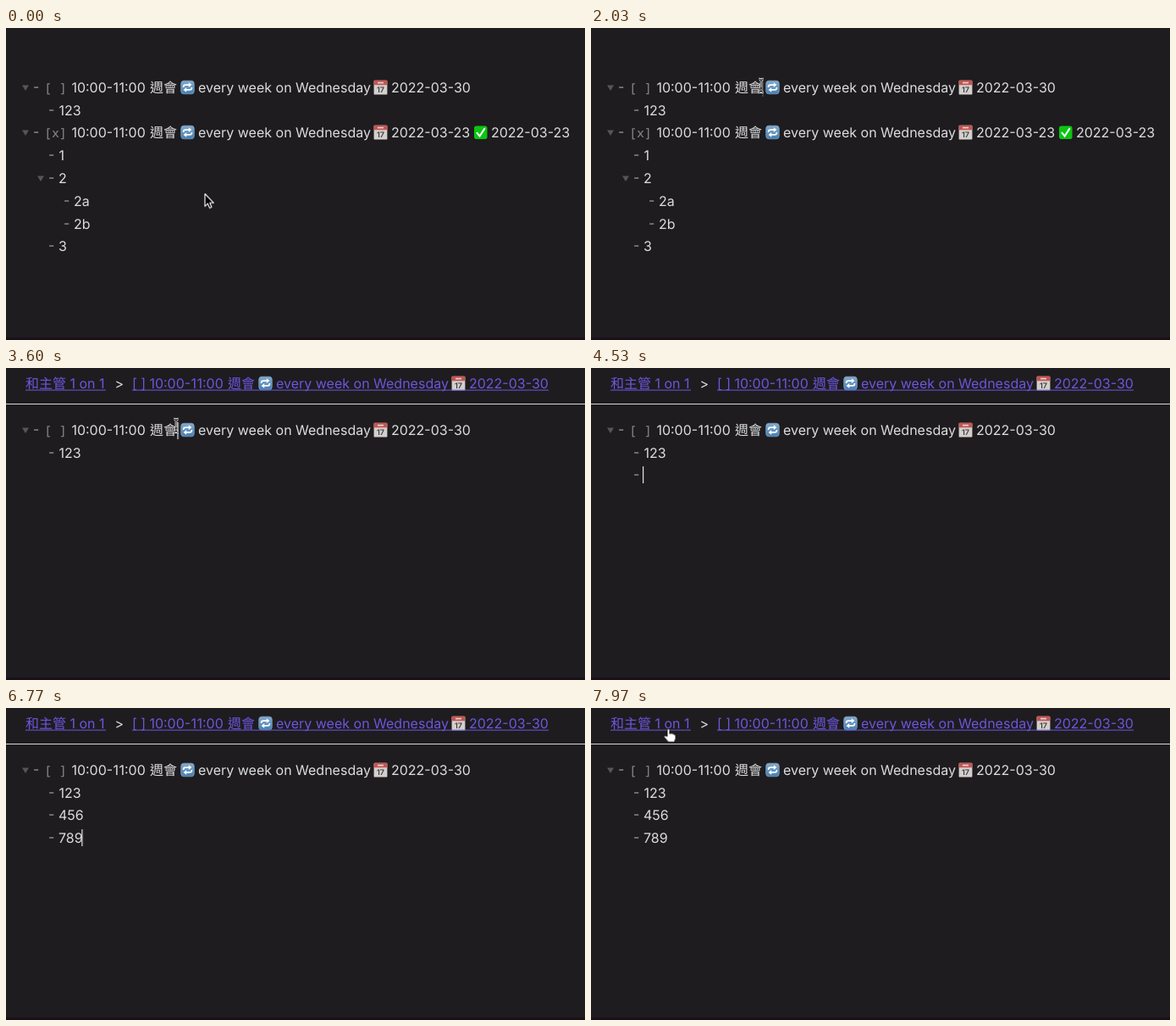
Animation, 684 px wide and 368 px high, one loop 8000 ms. Source, as an HTML page:

```html
<!DOCTYPE html>
<html lang="zh-Hant">
<head>
<meta charset="utf-8">
<title>Outline zoom</title>
<style>
  html, body { margin: 0; width: 100%; height: 100%; overflow: hidden; background: #1e1c1f; }
  svg { display: block; width: 684px; height: 368px; }
  text { font: 16px Inter, "Noto Sans CJK TC", sans-serif; fill: #dcddde; white-space: pre; text-rendering: geometricPrecision; }
  .cjk { font-family: "Noto Sans CJK TC", "Noto Sans CJK", sans-serif; }
  .mark { fill: #999; }
  .box { font: 15px "Noto Sans Mono", "DejaVu Sans Mono", monospace; fill: #888; }
  .fold { fill: #575558; }
  .link text { fill: #6c57dc; }
  .link .line { fill: #6c57dc; }
  .day { font-size: 9px; font-weight: 600; fill: #3c3a3c !important; text-anchor: middle; }
</style>
</head>
<body>
<svg id="stage" viewBox="0 0 684 368">
  <defs>
    <linearGradient id="blue" x2="0" y2="1">
      <stop stop-color="#83abcd"/><stop offset="1" stop-color="#447fb4"/>
    </linearGradient>
    <g id="repeat">
      <rect x=".7" y=".7" width="15.6" height="15.6" rx="3.4" fill="url(#blue)" stroke="#86a5c0" stroke-width=".7"/>
      <g id="turn">
        <path d="M3.6 8.6V8Q3.6 5.6 6 5.6H10.2" fill="none" stroke="#fff" stroke-width="1.7"/>
        <path d="M9.8 2.8L13.4 5.6 9.8 8.4Z" fill="#fff"/>
      </g>
      <use href="#turn" transform="rotate(180 8.5 8.5)"/>
    </g>
    <g id="calendar">
      <rect x=".6" y=".8" width="15.8" height="16.8" rx="1.2" fill="#d3cfcd"/>
      <path d="M.6 6.2V2Q.6 .8 1.8 .8H15.2Q16.4 .8 16.4 2V6.2Z" fill="#c25754"/>
      <path d="M5 3.6H12" stroke="#ecd2d0" stroke-width="1.6"/>
      <text class="day" x="8.5" y="15">17</text>
    </g>
    <g id="check">
      <rect width="15.5" height="15.5" rx="2.8" fill="#0cc511"/>
      <path d="M3.4 8.2L6.6 12 12.2 3.4" fill="none" stroke="#fff" stroke-width="2" stroke-linecap="round"/>
    </g>
  </defs>
  <rect width="684" height="368" fill="#1e1c1f"/>
  <rect y="365" width="684" height="3" fill="#1a101a"/>
  <g id="list"></g>
  <g id="zoomed"></g>
  <rect id="caret" width="1.2" height="20" fill="#e4e4e6"/>
  <g id="pointer">
    <path id="arrow" d="M0 0V14.8L3.3 11.7 5.6 16.8 8 15.8 5.7 10.8H10.4Z" stroke="#fff" stroke-width="1.1" stroke-linejoin="round"/>
    <g id="beam" fill="none">
      <path id="stem" d="M-2.8 -8Q0 -8 0 -5.8 0 -8 2.8 -8M0 -6V6M-2.8 8Q0 8 0 5.8 0 8 2.8 8M-1.5 3H1.5" stroke="#fff" stroke-width="2.6"/>
      <path d="M-2.8 -8Q0 -8 0 -5.8 0 -8 2.8 -8M0 -6V6M-2.8 8Q0 8 0 5.8 0 8 2.8 8M-1.5 3H1.5" stroke="#000"/>
    </g>
    <path id="hand" d="M-1.5 9V1.4A1.5 1.5 0 0 1 1.5 1.4V6L2.6 5.4A1.4 1.4 0 0 1 4.6 6 1.4 1.4 0 0 1 6.6 6.7Q8.6 6.5 8.6 8.6V11.5L7 15.8H0L-5.3 9.6Q-5.4 7.6 -3.4 8.2Z" fill="#fff" stroke="#000" stroke-width=".9"/>
  </g>
</svg>
<script>
const LOOP = 8000, ZOOM = 3330;
const $ = id => document.getElementById(id);

// Drawing helpers; every row is centred on y = 0.
const text = (x, s, cls = '', y = 6) => `<text x="${x}" y="${y}" class="${cls}">${s}</text>`;
const number = (x, s) => text(x, s.replace(/1/g, '<tspan dx=".4">1</tspan>'));
const icon = (id, x, y = -8.5) => `<use href="#${id}" x="${x}" y="${y}"/>`;
const row = (y, body, attrs = '') => `<g transform="translate(0 ${y})" ${attrs}>${body}</g>`;
const fold = x => `<path class="fold" d="M${x - 4} -2.6H${x + 4}L${x} 4Z"/>`;
const dash = x => text(x, '-', 'mark', 5);
const bullet = (x, body) => dash(x) + body;
const item = (x, s) => bullet(x, number(x + 12, s));

const meeting = (x, date) =>
  number(x, '10:00-11:00') + text(x + 93, '週會', 'cjk') + icon('repeat', x + 129) +
  text(x + 150, 'every week on Wednesday') + icon('calendar', x + 357, -9) +
  text(x + 378, date);
const task = (state, date) =>
  fold(23) + dash(32) + text(45, `[${state}]`, 'box') + meeting(77, date);
const underline = (x1, x2) =>
  `<rect class="line" x="${x1}" y="7.6" width="${x2 - x1}" height="1"/>`;

$('list').innerHTML =
  row(70, task(' ', '2022-03-30')) +
  row(97, item(50, '123')) +
  row(123, task('x', '2022-03-23') + icon('check', 553, -7.5) + text(573, '2022-03-23')) +
  row(150, item(50, '1')) +
  row(177, fold(41) + item(50, '2')) +
  row(204, item(68, '2a')) +
  row(231, item(68, '2b')) +
  row(257, item(50, '3'));

const typed = [
  { y: 126, enter: 4370, keys: [['4', 5030, 71.5], ['5', 5270, 81], ['6', 5530, 91]] },
  { y: 153, enter: 5900, keys: [['7', 6270, 70.5], ['8', 6530, 80], ['9', 6770, 90]] },
];
const typedRow = ({ y, enter, keys }) => row(y,
  bullet(50, text(62, keys.map(([c, ms]) => `<tspan data-from="${ms}">${c}</tspan>`).join(''))),
  `data-from="${enter}"`);

$('zoomed').innerHTML =
  row(18,
    `<g class="link">${text(23, '和主管 1 on 1')}${underline(23, 118)}</g>` +
    text(128.5, '&gt;') +
    `<g class="link">${text(149, '[ ]')}${meeting(169, '2022-03-30')}${underline(149, 641)}</g>`) +
  '<rect y="42" width="684" height="1" fill="#d6d6d8"/>' +
  row(73, task(' ', '2022-03-30')) +
  row(100, item(50, '123')) +
  typed.map(typedRow).join('');

// Motion helpers; steps are [ms, value], optionally with an easing to the next step.
const start = document.timeline.currentTime ?? performance.now();
function play(el, prop, steps, easing = 'linear') {
  const all = [...steps, [LOOP, steps.at(-1)[1]]];
  const frames = all.map(([ms, value, ease]) =>
    ({ offset: ms / LOOP, [prop]: value, easing: ease || easing }));
  el.animate(frames, { duration: LOOP, iterations: Infinity }).startTime = start;
}
const show = (el, steps) => play(el, 'visibility',
  steps.map(([ms, on]) => [ms, on ? 'visible' : 'hidden']), 'step-end');
const at = (x, y) => `translate(${x}px, ${y}px)`;

show($('list'), [[0, 1], [ZOOM, 0]]);
show($('zoomed'), [[0, 0], [ZOOM, 1]]);
document.querySelectorAll('[data-from]').forEach(el => show(el, [[0, 0], [+el.dataset.from, 1]]));

play($('caret'), 'transform', [
  [0, at(89, 87)], [1470, at(202.4, 61)], [ZOOM, at(202.4, 64)], [3900, at(89, 90)],
  ...typed.flatMap(({ y, enter, keys }) =>
    [[enter, at(61, y - 10)], ...keys.map(([, ms, x]) => [ms, at(x - .7, y - 10)])]),
], 'step-end');
play($('caret'), 'opacity', [
  [0, 0], [1270, 0], [1270, 1], [1930, 1], [2070, 0], [2530, 0], [2530, 1], [3000, 1], [3130, 0],
  [3300, 0], [3300, 1], [3770, 1], [3900, 0], [3900, 1], [4840, 1], [4970, 0], [5030, 0], [5030, 1],
  [7330, 1], [7470, 0],
]);

play($('pointer'), 'transform', [
  [0, at(235, 195.5)], [700, at(235, 195.5), 'ease-in-out'], [1070, at(203, 76.5)],
  [1370, at(203, 76.5)], [1470, at(201, 68)], [7330, at(201, 68), 'ease-in-out'], [7930, at(91.5, 24.5)],
]);
show($('arrow'), [[0, 1], [1400, 0], [7440, 1], [7800, 0]]);
show($('beam'), [[0, 0], [1400, 1], [3900, 0], [7030, 1], [7440, 0]]);
show($('hand'), [[0, 0], [7800, 1]]);
</script>
</body>
</html>
```
